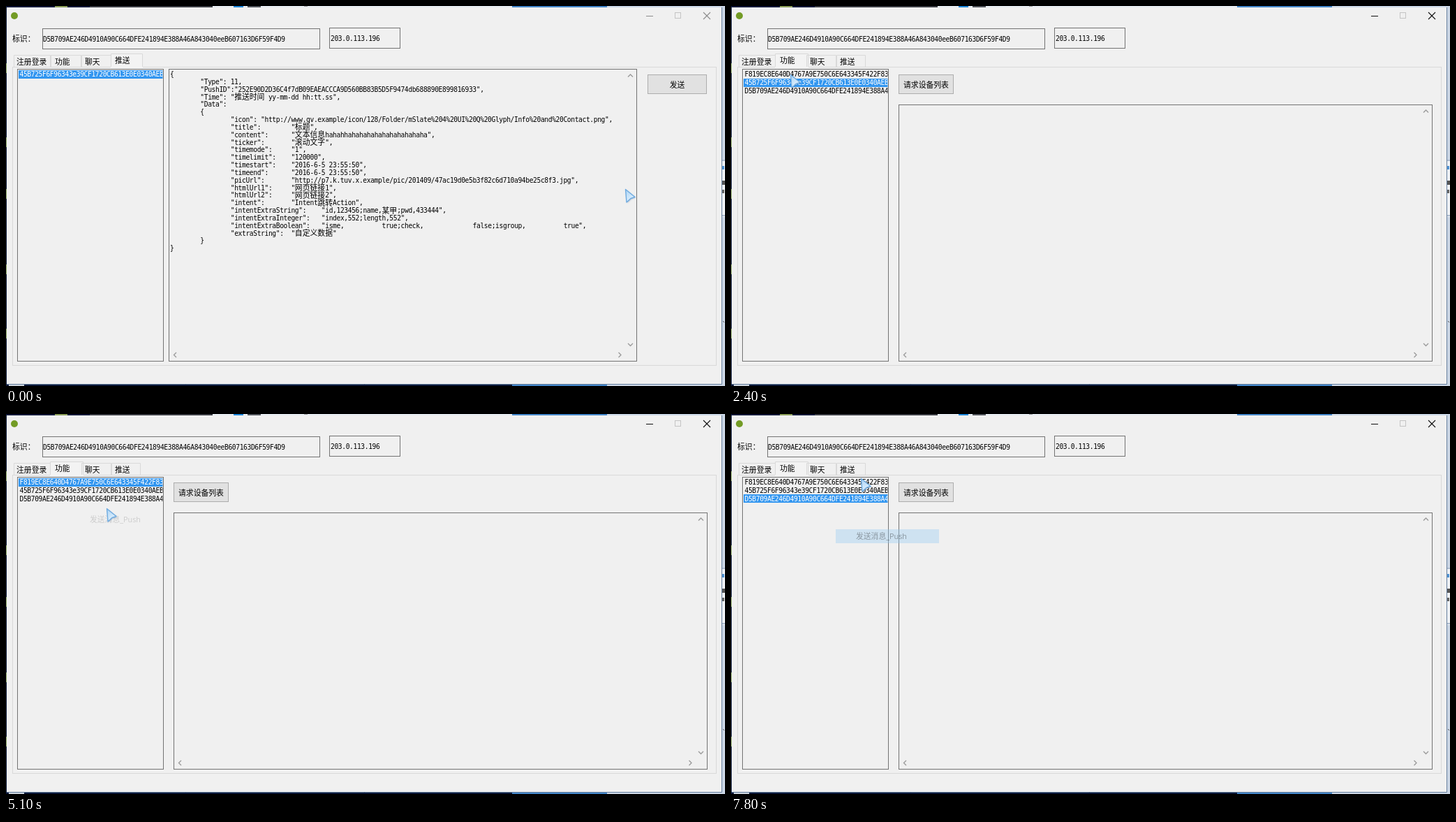
Write an HTML page with a canvas that moves like this. It is 1030 px wide and 544 px high and loops after 8000 ms.

```html
<!DOCTYPE html>
<html lang="zh">
<head>
<meta charset="utf-8">
<title>Push console</title>
<style>
html, body { margin: 0; width: 100%; height: 100%; overflow: hidden; background: #f0f0f0; }
canvas { display: block; }
</style>
</head>
<body>
<canvas id="stage" width="1030" height="544"></canvas>
<script>
const ctx = document.getElementById('stage').getContext('2d');
const LOOP = 8000;
const CELL = 5.42;
const MONO_SIZE = 9.6;
const MONO = `${MONO_SIZE}px "DejaVu Sans Mono", monospace`;
const CJK = `${CELL * 2}px "Noto Sans CJK SC", "Noto Sans CJK", sans-serif`;
const MENU_FONT = '10.8px "Open Sans", "Noto Sans CJK SC", "Noto Sans CJK", sans-serif';
const FACE = '#f0f0f0';
const LINE = '#737373';
const SELECT = '#3296f0';
const HOT = '#91c7f2';

const OWN_ID = 'D5B709AE246D4910A90C664DFE241894E388A46A843040eeB607163D6F59F4D9';
const DEVICES = [
  'F819EC8E640D4767A9E750C6E643345F422F83',
  '45B725F6F96343e39CF1720CB613E0E0340AEB',
  OWN_ID.slice(0, 38)
];
const TABS = ['注册登录', '功能', '聊天', '推送'];
const ITEMS = ['断开设备', '发送消息_IM', '发送消息_Push'];

// Each line is a list of column, text pairs.
const field = (name, value, col = 32) => [16, `"${name}":`, col, `"${value}",`];
const JSON_LINES = [
  [0, '{'],
  [8, '"Type": 11,'],
  [8, '"PushID":"252E90D2D36C4f7dB09EAEACCCA9D560BB83B5D5F9474db688890E899816933",'],
  [8, '"Time": "推送时间 yy-mm-dd hh:tt.ss",'],
  [8, '"Data":'],
  [8, '{'],
  field('icon', 'http://www.qv.example/icon/128/Folder/mSlate%204%20UI%20Q%20Glyph/Info%20and%20Contact.png', 24),
  field('title', '标题'),
  field('content', '文本信息hahah' + 'ha'.repeat(11)),
  field('ticker', '滚动文字'),
  field('timemode', '1'),
  field('timelimit', '120000'),
  field('timestart', '2016-6-5 23:55:50'),
  field('timeend', '2016-6-5 23:55:50'),
  field('picUrl', 'http://p7.k.tuv.x.example/pic/201409/47ac19d0e5b3f82c6d710a94be25c8f3.jpg'),
  field('htmlUrl1', '网页链接1'),
  field('htmlUrl2', '网页链接2'),
  field('intent', 'Intent跳转Action'),
  field('intentExtraString', 'id,123456;name,某甲;pwd,433444', 40),
  field('intentExtraInteger', 'index,552;length,552', 40),
  [16, '"intentExtraBoolean":', 40, '"isme,', 56, 'true;check,', 80, 'false;isgroup,', 104, 'true",'],
  [16, '"extraString":', 32, '"自定义数据"'],
  [8, '}'],
  [0, '}']
];

// Changes applied one after another; the last one reached holds.
const STEPS = [
  [0, { tab: 3, cursor: [887, 262], row: -1, menu: null, alpha: 1, hot: -1 }],
  [300, { cursor: [153, 9] }],
  [600, { cursor: [38, 36] }],
  [900, { cursor: [76, 46], editHot: true }],
  [1200, { cursor: [86, 75], editHot: false, tabHot: 1 }],
  [1500, { tab: 1, tabHot: -1, row: 1 }],
  [1800, { cursor: [85, 94] }],
  [2100, { cursor: [85, 99] }],
  [2400, { cursor: [85, 98] }],
  [2700, { cursor: [89, 99], row: 0, menu: [89, 100], alpha: 0.5 }],
  [3300, { alpha: 0.85 }],
  [3600, { cursor: [104, 105], alpha: 1 }],
  [4200, { cursor: [154, 124], hot: 0 }],
  [4500, { cursor: [159, 148], hot: 2 }],
  [4800, { cursor: [158, 149] }],
  [5100, { cursor: [144, 135], menu: null, ghost: { x: 89, y: 100, fill: 0, text: 0.16 } }],
  [6000, { cursor: [144, 127], ghost: null }],
  [6300, { cursor: [144, 119] }],
  [6600, { row: 2 }],
  [6900, { cursor: [146, 121], menu: [148, 124], alpha: 0.6, hot: -1 }],
  [7200, { cursor: [165, 138], alpha: 1, hot: 0 }],
  [7500, { cursor: [184, 172], hot: 2 }],
  [7800, { cursor: [186, 92], menu: null, ghost: { x: 148, y: 124, fill: 0.36, text: 0.36 } }]
];

function rect(x, y, w, h, color) {
  ctx.fillStyle = color;
  ctx.fillRect(x, y, w, h);
}

function frame(x, y, w, h, color = LINE, fill) {
  if (fill) rect(x, y, w, h, fill);
  ctx.strokeStyle = color;
  ctx.lineWidth = 1;
  ctx.strokeRect(x + 0.5, y + 0.5, w - 1, h - 1);
}

function path(points, color, width = 1) {
  ctx.beginPath();
  points.forEach(([x, y]) => ctx.lineTo(x, y));
  ctx.strokeStyle = color;
  ctx.lineWidth = width;
  ctx.stroke();
}

// Half-width and full-width runs sit on one cell grid, centred on y.
function text(str, x, y, color = '#000') {
  ctx.fillStyle = color;
  for (const run of str.match(/[\u2e80-\uffff]+|[^\u2e80-\uffff]+/g)) {
    const wide = run.charCodeAt(0) > 0x2e7f;
    ctx.font = wide ? CJK : MONO;
    ctx.letterSpacing = wide ? '0px' : `${CELL - MONO_SIZE * 0.602}px`;
    ctx.fillText(run, x, y + (wide ? 4.1 : 3.6));
    x += run.length * CELL * (wide ? 2 : 1);
  }
  ctx.letterSpacing = '0px';
}

function chevron(x, y, angle) {
  ctx.save();
  ctx.translate(x, y);
  ctx.rotate(angle);
  path([[-3.5, 2], [0, -1.5], [3.5, 2]], '#999', 1.3);
  ctx.restore();
}

function scrollBox(x, y, w, h) {
  frame(x, y, w, h);
  const right = x + w - 9.5, bottom = y + h - 9.5;
  chevron(right, y + 9.5, 0);
  chevron(right, bottom - 14.5, Math.PI);
  chevron(x + 9, bottom, -Math.PI / 2);
  chevron(right - 15, bottom, Math.PI / 2);
}

function button(x, y, w, h, label) {
  frame(x, y, w, h, '#adadad', '#e1e1e1');
  text(label, x + (w - label.length * CELL * 2) / 2, y + h / 2 + 0.5);
}

function drawDesktop() {
  rect(0, 0, 1030, 544, '#0b1838');
  rect(70, 0, 18, 3, '#8a9c58');
  rect(120, 0, 176, 3, '#3a3c42');
  rect(296, 0, 430, 3, '#e6ebf1');
  rect(326, 0, 14, 2, '#1d86d8');
  rect(346, 0, 19, 2, '#50545a');
  rect(427, 0, 5, 1, '#999');
  rect(4, 541, 22, 3, '#c9d2dc');
  for (const y of [0, 541]) {
    rect(725, y, 136, 3, '#4385c8');
    rect(861, y, 169, 3, '#cbd6e5');
  }
  rect(1025, 0, 5, 544, '#cbd6e5');
  rect(1026, 222, 4, 80, '#eef1f5');
  rect(1026, 220, 4, 2, '#aebccf');
  rect(1026, 299, 4, 2, '#aebccf');
  rect(1026, 229, 3, 5, '#4e93d4');
  rect(1026, 250, 4, 6, '#555');
  rect(1026, 263, 3, 5, '#666');
  path([[1027, 451], [1029, 453]], '#555');
  for (const y of [82, 188, 262, 370, 462]) rect(0, y, 1, 14, '#809b5d');
}

function drawWindow(s) {
  rect(1, 2, 1024, 539, FACE);
  path([[1, 541.5], [1025.5, 541.5], [1025.5, 2]], '#667f9e');
  ctx.beginPath();
  ctx.arc(12, 14, 5, 0, 7);
  ctx.fillStyle = '#739b25';
  ctx.fill();

  const ink = s.tab === 3 ? '#8c8c8c' : '#111';
  path([[917, 14.5], [927, 14.5]], ink);
  frame(958, 9, 9, 9, '#c4c4c4');
  path([[999, 9], [1009, 19]], ink, 1.1);
  path([[1009, 9], [999, 19]], ink, 1.1);

  text('标识：', 9, 47);
  frame(52, 32, 398, 30, s.editHot ? '#171717' : LINE);
  text(OWN_ID, 53, 47);
  frame(463, 31, 102, 30);
  text('203.0.113.196', 465, 46.5);
}

function drawTabs(s) {
  const border = '#d9d9d9';
  frame(9, 87, 1009, 428, border);
  const edges = [11, 64, 107.5, 150.5, 193];
  TABS.forEach((label, i) => {
    const on = i === s.tab;
    const x = Math.round(edges[i]) - (on ? 1 : 0);
    const right = Math.round(edges[i + 1]) + (on ? 3 : 0);
    const top = on ? 68 : 70;
    if (i === s.tabHot) rect(x, top, right - x, 17, '#d5e8f8');
    if (on) rect(x, top, right - x, 20, '#f3f3f3');
    path([[x + 0.5, 87], [x + 0.5, top + 0.5], [right - 0.5, top + 0.5], [right - 0.5, 87]], border);
  });
  TABS.forEach((label, i) => {
    text(label, [15, 70, 113, 156][i], i === s.tab ? 77.5 : 79.5);
  });
}

function drawList(rows, selected) {
  frame(16, 90, 210, 419);
  ctx.save();
  ctx.beginPath();
  ctx.rect(18, 91, 206.5, 416);
  ctx.clip();
  rows.forEach((id, i) => {
    const y = 97.8 + i * 11.8;
    if (i === selected) rect(18, Math.round(y - 6), 207, 12, SELECT);
    text(id, 19.5, y, i === selected ? '#fff' : '#000');
  });
  ctx.restore();
}

function drawPushPage() {
  drawList([DEVICES[1]], 0);
  scrollBox(233, 90, 671, 419);
  JSON_LINES.forEach((line, row) => {
    for (let i = 0; i < line.length; i += 2) {
      // The icon value follows its key after one space.
      const col = line[i] === 24 ? 24 : line[i];
      text(line[i + 1], 235 + col * CELL, 97.5 + row * 10.83);
    }
  });
  button(919, 98, 85, 28, '发送');
}

function drawDevicePage(s) {
  drawList(DEVICES, s.row);
  button(240, 98, 79, 28, '请求设备列表');
  scrollBox(240, 141, 765, 368);
}

function menuItem(i, x, y) {
  ctx.font = MENU_FONT;
  ctx.fillStyle = '#111';
  ctx.fillText(ITEMS[i], x + 31, y + 15.6 + i * 19.8);
}

function hotBar(i, x, y) {
  rect(x + 2, Math.round(y + 2 + i * 19.6), 148, 20, HOT);
}

function drawMenu(s) {
  const [x, y] = s.menu;
  ctx.save();
  ctx.globalAlpha = s.alpha;
  ctx.shadowColor = 'rgba(0,0,0,.55)';
  ctx.shadowBlur = 3;
  ctx.shadowOffsetX = ctx.shadowOffsetY = 2;
  rect(x, y - 1, 153, 65, '#f2f2f2');
  ctx.shadowColor = 'transparent';
  frame(x, y - 1, 153, 65, '#c6c6c6');
  if (s.hot >= 0) hotBar(s.hot, x, y);
  ITEMS.forEach((_, i) => menuItem(i, x, y));
  ctx.restore();
}

function drawGhost({ x, y, fill, text: ink }) {
  ctx.save();
  ctx.globalAlpha = fill;
  hotBar(2, x, y);
  ctx.globalAlpha = ink;
  menuItem(2, x, y);
  ctx.restore();
}

function drawCursor([x, y]) {
  ctx.save();
  ctx.translate(x, y);
  ctx.beginPath();
  for (const p of [[0.5, 0.5], [14, 11.5], [8, 13.5], [2, 19]]) ctx.lineTo(...p);
  ctx.closePath();
  ctx.lineJoin = 'round';
  ctx.shadowColor = 'rgba(60,100,150,.4)';
  ctx.shadowBlur = 2;
  ctx.shadowOffsetX = ctx.shadowOffsetY = 1;
  const glow = ctx.createLinearGradient(0, 0, 10, 17);
  glow.addColorStop(0, '#a9d3f5');
  glow.addColorStop(1, '#e2f1fd');
  ctx.fillStyle = glow;
  ctx.fill();
  ctx.shadowColor = 'transparent';
  ctx.strokeStyle = '#6fabe0';
  ctx.lineWidth = 1.4;
  ctx.stroke();
  ctx.restore();
}

function stateAt(t) {
  return Object.assign({}, ...STEPS.filter(([at]) => at <= t).map(([, change]) => change));
}

function draw() {
  const s = stateAt(performance.now() % LOOP);
  drawDesktop();
  drawWindow(s);
  drawTabs(s);
  if (s.tab === 3) drawPushPage();
  else drawDevicePage(s);
  if (s.menu) drawMenu(s);
  if (s.ghost) drawGhost(s.ghost);
  drawCursor(s.cursor);
  requestAnimationFrame(draw);
}

draw();
</script>
</body>
</html>
```
